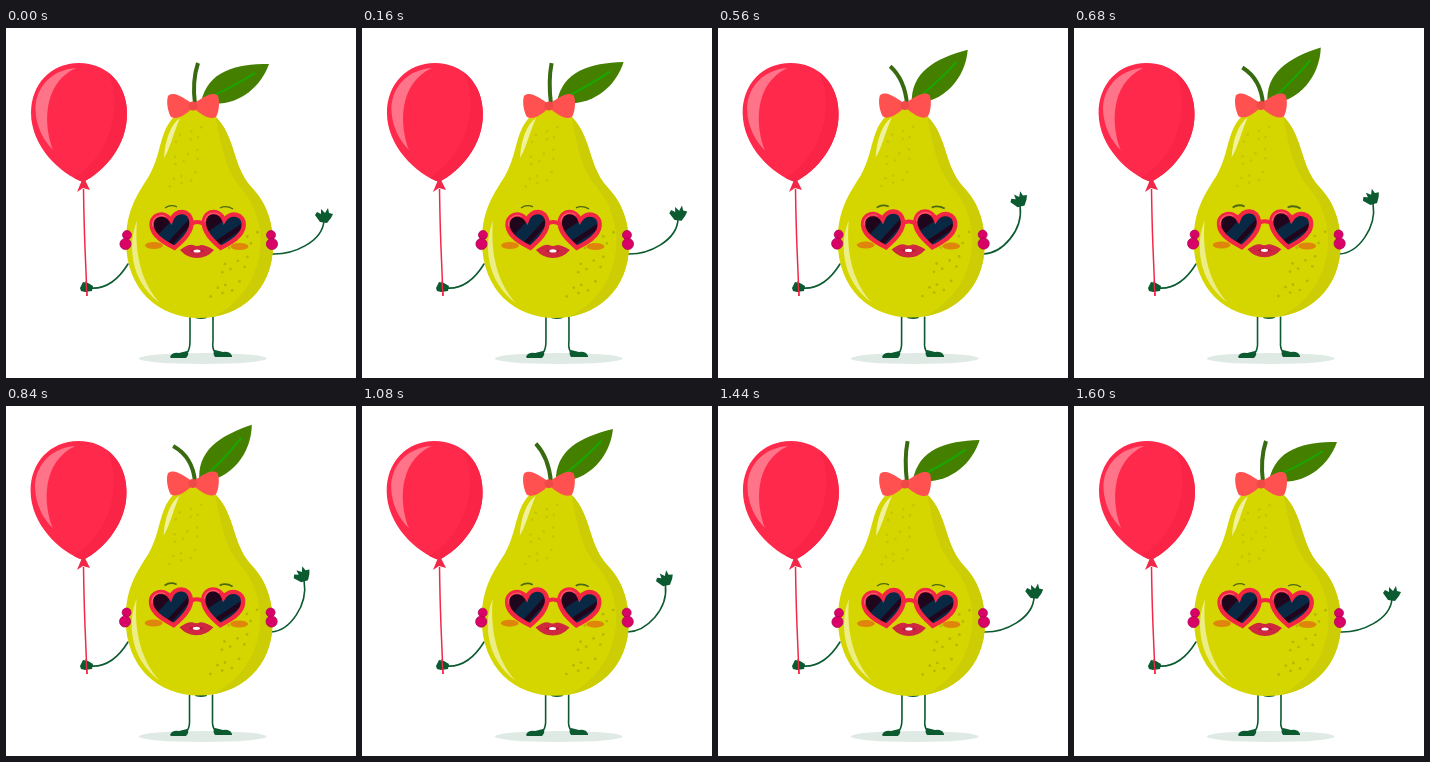
An HTML page that plays this animation: 350 by 350 pixels, repeating every 1680 ms.

```html
<!DOCTYPE html>
<html lang="en">
<head>
<meta charset="utf-8">
<title>Waving pear</title>
<style>
  html, body { margin: 0; width: 100%; height: 100%; overflow: hidden; background: #fff; }
  svg { display: block; width: 100vw; height: 100vh; }
  .line { fill: none; stroke: #0b5a30; stroke-width: 1.6; stroke-linecap: round; }
  .limb { fill: #0b5a30; }
</style>
</head>
<body>
<svg viewBox="0 0 350 350">
  <defs>
    <path id="pear" d="M187 80C174 80 164 90 158 105C153 118 152 132 143 148C133 164 120 181 120 213C120 262 153 290 193 290C235 290 267 261 267 217C267 190 258 173 247 161C233 146 231 132 225 115C218 95 207 80 187 80Z"/>
    <path id="balloon" d="M73 35C45 35 25 56 25 85C25 118 54 146 77 154C99 143 121 117 121 86C121 56 101 35 73 35Z"/>
    <path id="heart" d="M0 18C-9 12-20 4-20-6C-20-19-5-20 0-10C5-20 20-19 20-6C20 4 9 12 0 18Z"/>
    <clipPath id="inPear"><use href="#pear"/></clipPath>
    <clipPath id="inBalloon"><use href="#balloon"/></clipPath>
    <clipPath id="inHeart"><use href="#heart"/></clipPath>
    <g id="lens">
      <use href="#heart" fill="#20061d"/>
      <g clip-path="url(#inHeart)" stroke="#082843">
        <path d="M-18 14L16-15" stroke-width="12"/>
        <path d="M-4 19L23-4" stroke-width="4"/>
      </g>
      <use href="#heart" fill="none" stroke="#f32643" stroke-width="4.4"/>
      <path d="M-19-6C-19-15-10-18-5-14" fill="none" stroke="#ff6577"/>
    </g>
  </defs>

  <ellipse cx="196.7" cy="330.5" rx="64" ry="5.5" fill="#dfeae5"/>
  <g class="limb">
    <path d="M164 329Q166 324 173 325L181 323Q184 326 180 330H165Z"/>
    <path d="M226 328Q224 323 217 324L209 322Q206 325 209 329H226Z"/>
    <ellipse cx="195" cy="289.5" rx="6" ry="1.5"/>
  </g>
  <path id="legs" class="line"/>

  <path class="line" d="M84 260Q106 262 122 236"/>
  <path id="arm" class="line"/>
  <path id="hand" class="limb" d="M314 194L309 187L311 184L315 186L315 181L319 185L322 180L323 185L327 186L325 190L321 195Z"/>

  <path id="stem" fill="none" stroke="#386a10" stroke-width="4"/>
  <g id="leaf">
    <path d="M195 74C202 43 229 36 263 36C254 62 227 82 195 74Z" fill="#457f00"/>
    <path d="M195 73Q222 62 249 45" fill="none" stroke="#18a800" stroke-width="2"/>
  </g>

  <g id="body">
    <use href="#pear" fill="#d5d600"/>
    <g clip-path="url(#inPear)">
      <path d="M208 80C216 126 221 143 235 160C268 198 260 265 203 291H280V80Z" fill="#cdcd06"/>
      <g id="dots"/>
    </g>
    <path d="M174 90C165 96 159 112 158 130C164 121 167 106 174 90Z" fill="#f0f19c"/>
    <path d="M131 193C122 214 123 253 154 275C137 257 128 228 131 193Z" fill="#eced84"/>
    <g fill="#d90368" stroke="#aa0055" stroke-width=".7">
      <circle cx="121" cy="207" r="4.5"/><circle cx="119.5" cy="216" r="5.6"/>
      <circle cx="265" cy="207" r="4.5"/><circle cx="266" cy="216" r="5.6"/>
    </g>
    <g fill="#e0850c">
      <ellipse cx="148" cy="217.5" rx="9" ry="3.5"/><ellipse cx="233.5" cy="218.5" rx="9" ry="3.5"/>
    </g>
    <path id="brows" d="M159 180Q165 176 171 179M214 180Q220 177 227 181" fill="none" stroke="#4d6812"/>
  </g>

  <g id="face">
    <path d="M185 196Q191 192 198 196" fill="none" stroke="#f32643" stroke-width="4"/>
    <use href="#lens" transform="translate(166.3 202) rotate(-7)"/>
    <use href="#lens" transform="translate(217 202) rotate(7)"/>
    <path d="M174 222Q182 216 187 217Q191 219 195 217Q200 217 208 222Q201 230 191 230Q181 230 174 222Z" fill="#cf2740"/>
    <path d="M183 223Q191 219.5 199 223Q191 226.5 183 223Z" fill="#b3173a"/>
    <ellipse cx="191" cy="223" rx="3.6" ry="1.6" fill="#fff"/>
  </g>

  <g id="bow">
    <g fill="#ff5250">
      <path d="M187 76C179 71 168 62 162 68C160 74 162 84 165 89C172 93 181 85 187 80Z"/>
      <path d="M187 76C195 71 206 62 212 68C214 74 213 84 210 89C203 93 194 85 187 80Z"/>
    </g>
    <ellipse cx="187" cy="78" rx="4.5" ry="4.5" fill="#f04a48"/>
  </g>

  <g id="float">
    <use href="#balloon" fill="#ff294c"/>
    <g clip-path="url(#inBalloon)">
      <path d="M98 38C119 69 108 126 67 150L80 160L130 130V40Z" fill="#fa2447"/>
    </g>
    <path d="M70 40C43 42 29 62 29.5 82C30 98 37 112 47 122C38 100 35 56 70 40Z" fill="#ff7489"/>
    <path d="M76 152H79L84 162L77 160L71 164Z" fill="#f32747"/>
  </g>
  <path d="M77.5 161Q78 195 79 220T81 268" fill="none" stroke="#f32747" stroke-width="1.5"/>
  <path class="limb" d="M74 260L77 254L82 255L87 258L86 263L79 264L75 263Z"/>
  <path d="M80 253L81 268" stroke="#f32747" stroke-width="1.3"/>
</svg>
<script>
const LOOP = 1680, SWING = 1600, STEP = 40;
const el = id => document.getElementById(id);
const rotate = (id, angle, x, y) =>
  el(id).setAttribute('transform', `rotate(${angle} ${x} ${y})`);
const shift = (id, x, y) => el(id).setAttribute('transform', `translate(${x} ${y})`);
const draw = (id, d) => el(id).setAttribute('d', d);

// Staggered rows of speckles
function speckle(x, y, cols, rows, dx, dy, slant, color) {
  for (let r = 0; r < rows; r++) for (let c = 0; c < cols; c++) {
    const dot = document.createElementNS('http://www.w3.org/2000/svg', 'circle');
    dot.setAttribute('cx', x + c * dx + r * slant + 2 * Math.sin(r * 5 + c * 3));
    dot.setAttribute('cy', y + r * dy - c * 3 + 2 * Math.cos(r * 3 + c * 7));
    dot.setAttribute('r', 1.4);
    dot.setAttribute('fill', color);
    el('dots').append(dot);
  }
}
speckle(174, 105, 3, 6, 11, 11, -2, '#c6c700');
speckle(230, 210, 3, 6, 11, 12, -5, '#b7b800');

function pose(ms) {
  const t = Math.floor(ms % LOOP / STEP) * STEP;
  const p = (1 - Math.cos(2 * Math.PI * t / SWING)) / 2;
  const mix = (a, b) => a + (b - a) * p;
  rotate('hand', -26 * p, 266, 226);
  draw('arm', `M265 226C${mix(287, 284)} ${mix(227, 225)} ${mix(317, 302)} ${mix(214, 199)} ${mix(318, 298)} ${mix(192, 175)}`);
  draw('stem', `M189 76Q${mix(186, 187)} ${mix(53, 51)} ${mix(192, 167)} ${35 + 5 * p * p}`);
  rotate('leaf', -18.7 * p, 202, 80);
  shift('body', -0.4 * p, -0.5 * p);
  shift('face', -0.6 * p, -0.7 * p);
  shift('bow', -0.2 * p, -0.5 * p);
  rotate('float', -0.3 * p, 78, 163);
  el('brows').setAttribute('stroke-width', mix(1.3, 1.8));
  draw('legs', `M${184 - p / 2} 289V313Q184 321 181 325M${207 - p / 2} 289V313Q206 321 209 324`);
}

function tick(now) {
  pose(now);
  requestAnimationFrame(tick);
}
pose(0);
requestAnimationFrame(tick);
</script>
</body>
</html>
```
